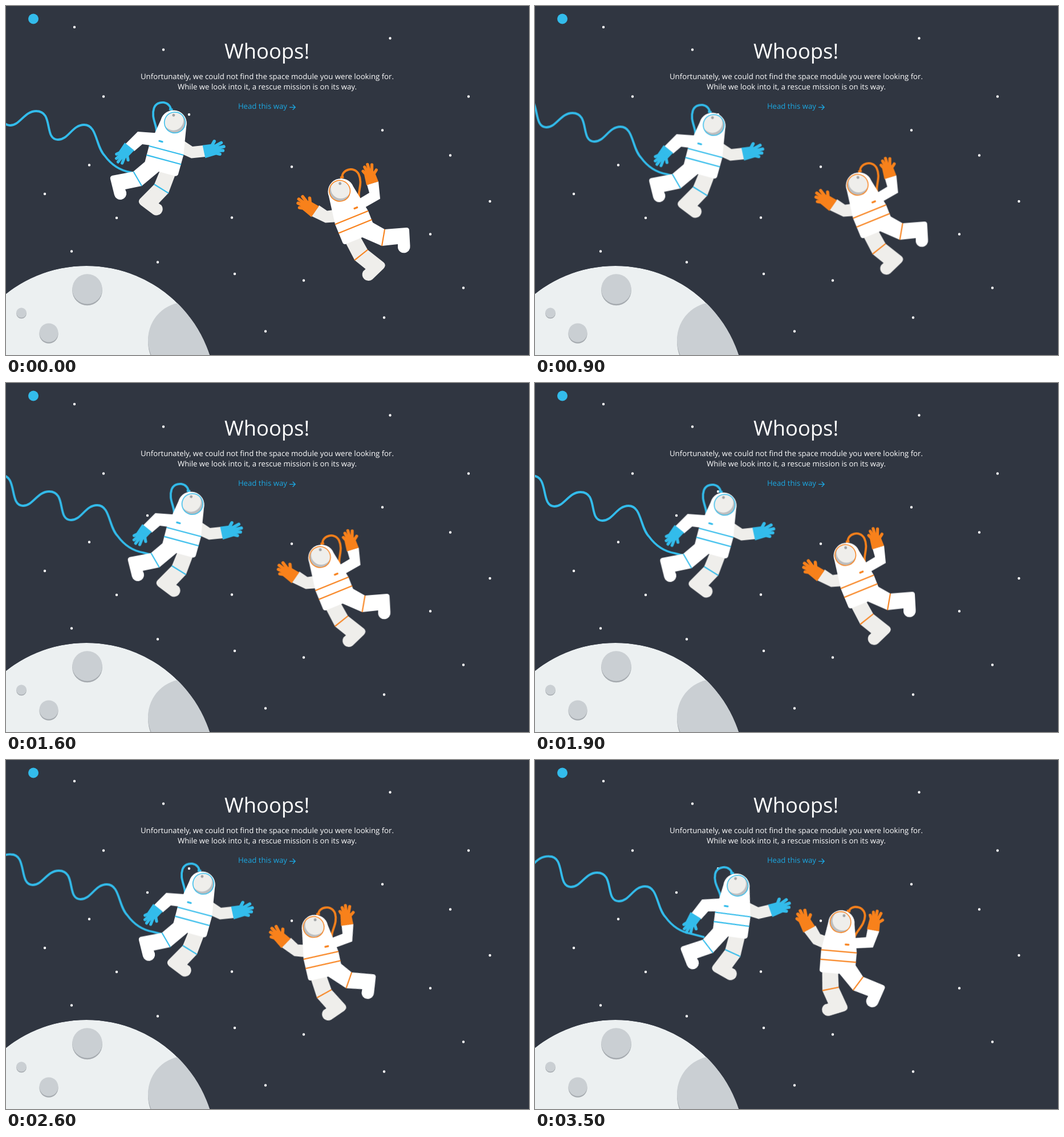
These frames come from a looping animation (917 by 611 pixels, 3.6 s). An HTML page:

```html
<!DOCTYPE html>
<html lang="en">
<head>
<meta charset="utf-8">
<title>Whoops!</title>
<style>
  html, body { margin: 0; width: 100%; height: 100%; overflow: hidden; background: #303641; }
  svg { display: block; width: 917px; height: 611px; }
  text { font-family: "Open Sans", "Noto Sans", sans-serif; font-size: 13.2px; fill: #fff; text-rendering: geometricPrecision; }
  .mid { text-anchor: middle; }
  .title { font-size: 36.3px; }
  .link { fill: #1ba8e2; }
  .arrow { fill: none; stroke: #1ba8e2; stroke-width: 1.3; }
  .stars { fill: none; stroke: #fff; stroke-width: 4.4; stroke-linecap: round; }
  .crater { fill: #cacfd3; }
  .shade { fill: #a5aaaf; }
  .blue { color: #33bceb; }
  .orange { color: #f8811b; }
  .suit { fill: #fff; }
  .back { fill: #efeeeb; }
  .line { fill: none; stroke: currentColor; stroke-width: 2.1; }
  .tube { fill: none; stroke: currentColor; stroke-width: 3.8; }
  .hand { fill: currentColor; stroke: currentColor; stroke-linecap: round; }

  .rope, .drift { animation: 3.6s infinite; }
  .rope { animation-name: rope; }
  .blue.drift { animation-name: blue; transform-origin: 281px 253px; }
  .orange.drift { animation-name: orange; transform-origin: 606px 370.5px; }

  /* ten poses a second */
  @keyframes rope {
    0% { transform: translate(0, 0); animation-timing-function: steps(19); }
    52.77778% { transform: translate(27px, 7px); animation-timing-function: steps(17); }
    100% { transform: translate(57.8px, 13.6px); }
  }
  @keyframes blue {
    0% { transform: translate(0, 0) rotate(0deg); animation-timing-function: steps(26); }
    72.22222% { transform: translate(50px, 12.6px) rotate(0deg); animation-timing-function: steps(4); }
    83.33333% { transform: translate(55.4px, 14.2px) rotate(-3.3deg); animation-timing-function: steps(6); }
    100% { transform: translate(67.8px, 18.2px) rotate(-8.2deg); }
  }
  @keyframes orange {
    0% { transform: translate(0, 0) rotate(0deg); animation-timing-function: steps(21); }
    58.33333% { transform: translate(-45.3px, -24.8px) rotate(0deg); animation-timing-function: steps(5); }
    72.22222% { transform: translate(-53.7px, -28.5px) rotate(9.5deg); animation-timing-function: steps(4); }
    83.33333% { transform: translate(-61.7px, -31.1px) rotate(17.5deg); animation-timing-function: steps(6); }
    100% { transform: translate(-75.3px, -36.4px) rotate(28.9deg); }
  }
</style>
</head>
<body>
<svg viewBox="0 0 917 611">
  <defs>
    <clipPath id="disc"><circle cx="141" cy="682.5" r="227.5"/></clipPath>
    <clipPath id="visor"><circle cx="1.8" cy="-51.2" r="18.3"/></clipPath>

    <!-- upright torso with air hose and far leg, centred on the upper belt -->
    <g id="torso">
      <path class="tube" d="M-24-20C-24-38-41-46-40-66C-38.5-83-14-85-10.5-70"/>
      <path class="tube" d="M-14-71.5L-7.5-72"/>
      <path class="back" d="M-1.3 34L-5 62.700L-22.7 93.500Q-26 99.700-18.500 103.700L7 114A11 11 0 0 0 16.500 94.600L11 92.700L23 71L26.6 34Z"/>
      <path class="line" d="M-5 62.700L23 71"/>
      <path class="suit" d="M-23.2-49A23.2 23.2 0 0 1 23.2-49L31.300 0L31 34Q31 39 26 39L-26 39Q-31 39-31 34L-31.300 0Z"/>
      <path class="line" d="M-31.300 0H31.300M-31.5 16.600H31.5"/>
      <path class="line" d="M-16-13H-10.6" style="stroke-width:3.2;stroke-linecap:round"/>
      <g clip-path="url(#visor)">
        <circle cx="1.8" cy="-51.2" r="18.3" fill="#bcbec0"/>
        <circle cx="-1.500" cy="-54.300" r="17.500" fill="#efeeeb"/>
      </g>
      <circle cx="-3.5" cy="-63" r="2.4" fill="#a0a2a4"/>
      <circle class="line" cx="1.8" cy="-51.2" r="18.3" style="stroke-width:1.5"/>
    </g>

    <!-- open hand pointing right, cuff at the left -->
    <g id="hand" class="hand">
      <path stroke="none" d="M0-11.5L18-10L26-5L27 4L19 10L0 11.5Z"/>
      <path fill="none" stroke-width="5.6" d="M13-4L21.5-14M17-4L33-9M17-1L36-1.5M17 2L33 5M14 4L26.5 10"/>
    </g>
  </defs>

  <rect width="917" height="611" fill="#303641"/>

  <path class="stars" d="M120 37h.01M276 76.500h.01M171 158.500h.01M321 190h.01M248 232h.01M146 278.500h.01M68 329h.01M194 371h.01M115 429.500h.01M266 448.500h.01M396 370.500h.01M401 469h.01M455 569.500h.01M522 480.500h.01M501 281.500h.01M673.500 56.500h.01M660 217.500h.01M811 158.500h.01M779 261.500h.01M848.500 342h.01M744 399.500h.01M802 493.500h.01M663 545.500h.01"/>

  <circle class="blue" cx="48" cy="22.500" r="9" fill="currentColor"/>

  <g clip-path="url(#disc)">
    <circle cx="141" cy="682.5" r="227.5" fill="#ecf0f1"/>
    <circle class="shade" cx="142.500" cy="498" r="26.300"/>
    <circle class="crater" cx="142.500" cy="495.500" r="26.300"/>
    <circle class="shade" cx="75" cy="574.300" r="16.500"/>
    <circle class="crater" cx="75" cy="572" r="16.500"/>
    <circle class="shade" cx="27" cy="538.500" r="8.800"/>
    <circle class="crater" cx="27" cy="537" r="8.800"/>
    <circle class="shade" cx="315" cy="588" r="66"/>
    <circle class="crater" cx="315" cy="584.500" r="66"/>
  </g>

  <text class="mid title" x="457.600" y="91.500">Whoops!</text>
  <text class="mid" x="458" y="128.200">Unfortunately, we could not find the space module you were looking for.</text>
  <text class="mid" x="458" y="146.300">While we look into it, a rescue mission is on its way.</text>
  <text class="link" x="406.900" y="179.700">Head this way</text>
  <path class="arrow" d="M497 177.300H507M502.700 172.800L507.200 177.300L502.700 181.800"/>

  <g class="blue">
    <path class="tube rope" d="M-60 171C-50 158-40 155-31 155.500C-2 155.500-18 209 7 209C25 209 32 184 53 184C84 184 66 234 91 234C110 234 116 208 137 208C160 208 157 246 173 262C184 277 200 288 218 291L241 297"/>
  </g>

  <g class="blue drift">
    <path class="back" d="M309 234L327 246L346 244L350 264L325 266.500L304 257Z"/>
    <use href="#torso" transform="translate(281 253) rotate(15)"/>
    <path class="suit" d="M248 269L223 290L186 297Q182 298.500 183 303L190 331A10.800 10.800 0 0 0 211 326L209 321L238 315L268 290Z"/>
    <path class="line" d="M223.500 290L238 315"/>
    <path class="suit" d="M266 222.500L231 220L209 242L225 254L239 242L258 244.500Z"/>
    <use href="#hand" transform="translate(347 255) rotate(-12)"/>
    <use href="#hand" transform="translate(216.500 246) rotate(129) scale(.93)"/>
  </g>

  <g class="orange drift">
    <path class="back" d="M578 356.500L563 358.500L549 349L536 368L560 379.500L582 378Z"/>
    <use href="#torso" transform="translate(606 370.5) rotate(-22) scale(-1 1)"/>
    <path class="suit" d="M641 378L664 391L702 388Q707 388 707 393L708.500 420A10.800 10.800 0 0 1 687 423L687 417L659 420L620 403Z"/>
    <path class="line" d="M664 391L659 420"/>
    <path class="suit" d="M633 313L637 327L612 342L620 358L656 337.500L653 307Z"/>
    <use href="#hand" transform="translate(542 360) rotate(215) scale(1 -1)"/>
    <use href="#hand" transform="translate(642.5 310.5) rotate(253) scale(.95 -.95)"/>
  </g>
</svg>
</body>
</html>
```
